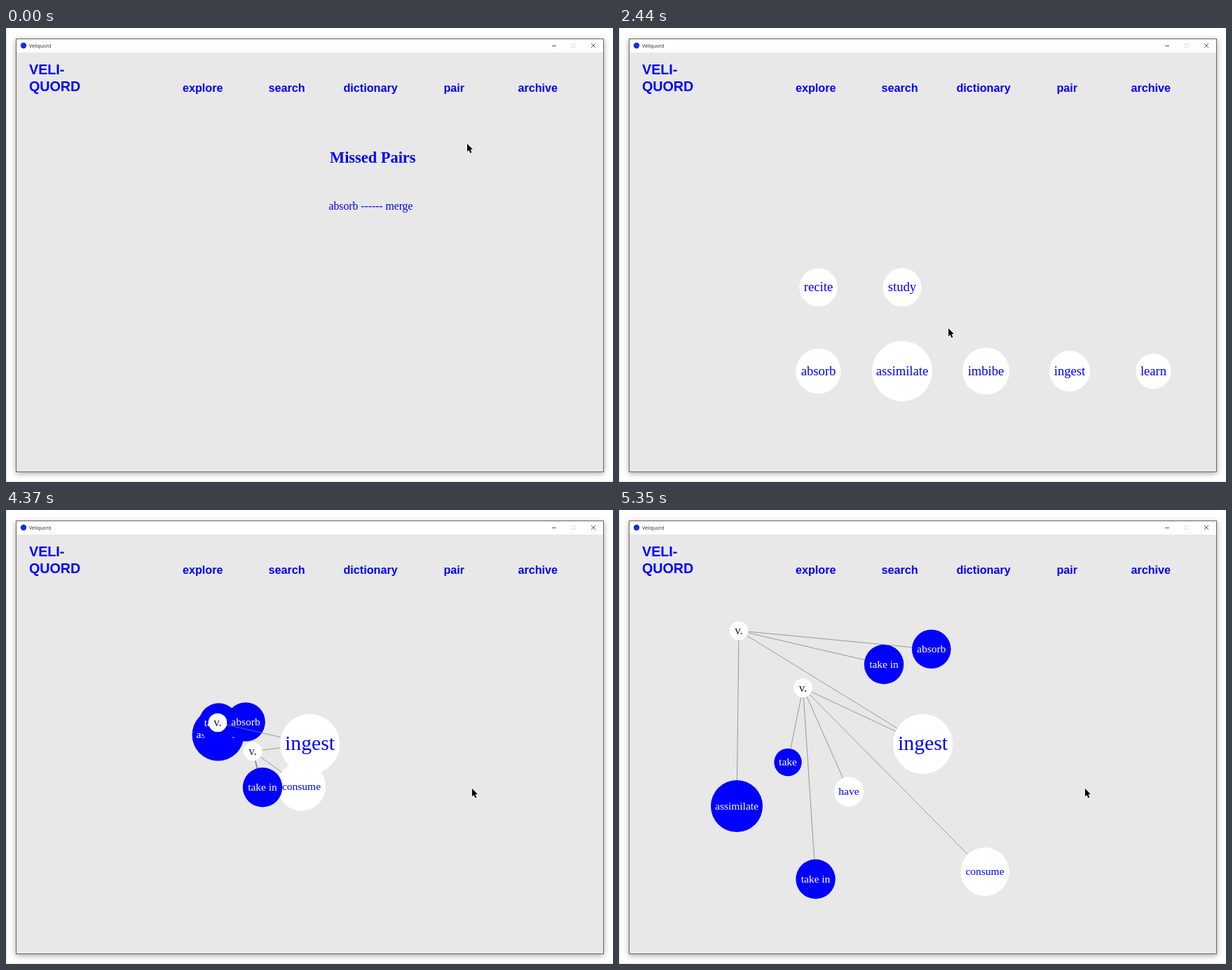
These frames come from a looping animation (866 by 647 pixels, 5410 ms). An HTML page with a canvas:

```html
<!DOCTYPE html>
<html lang="en">
<head>
<meta charset="utf-8">
<title>Veliquord</title>
<style>
  html, body { margin: 0; width: 100%; height: 100%; overflow: hidden; background: #fff; }
  canvas { display: block; }
</style>
</head>
<body>
<canvas id="stage" width="866" height="647"></canvas>
<script>
const ctx = document.getElementById('stage').getContext('2d');
const LOOP = 5410, GRAPH_START = 4125, SLOW = 152.2, FAST = 61;
const BLUE = '#00f', WHITE = '#fff';
const SERIF = '"Liberation Serif", "Times New Roman", serif';
const SANS = '"Liberation Sans", Arial, sans-serif';

// Keys are [step, ...values]
const cursorKeys = [
  [2, 658, 165], [3, 675, 155], [5, 757, 79], [7, 757, 86], [8, 757, 86],
  [9, 757, 126], [12, 625, 290], [15, 478, 421], [16, 470, 428], [19, 462, 446],
  [22, 500, 436], [23, 525, 440], [24, 560, 438], [25, 622, 432], [26, 648, 420], [27, 665, 397]
];
const scrollKeys = [[8, 56], [9, 0], [10, 0], [14, -24], [16, -24], [21, -72]];

// Word, column, row, radius
const words = [
  ['recite', 0, 0, 27.2], ['study', 1, 0, 27.5],
  ['absorb', 0, 1, 32.2], ['assimilate', 1, 1, 43], ['imbibe', 2, 1, 33.5],
  ['ingest', 3, 1, 29], ['learn', 4, 1, 25.3]
];

// Each path holds x, y at graph steps 4, 13 and 20
const hubs = [
  [302, 303, 213, 214, 171, 172],
  [352, 344, 289.5, 281, 262.5, 253.5]
];
const root = { text: 'ingest', x: 433.5, y: 333.5, r: 42.7 };
const nodes = [
  ['consume', 1, 34.7, WHITE, [421.5, 394, 483.5, 477.5, 522, 515.5]],
  ['have', 1, 21.2, WHITE, [366, 391, 362.5, 364.5, 328, 401.5]],
  ['take', 1, 19.7, BLUE, [364, 394, 293.5, 374.5, 241, 359.5]],
  ['take in', 1, 28.2, BLUE, [366, 395.3, 300.8, 484, 280.5, 526]],
  ['assimilate', 0, 37, BLUE, [302.5, 320.5, 216, 395, 168, 422]],
  ['take in', 0, 28.2, BLUE, [303.5, 303.5, 336, 240.5, 378, 220]],
  ['absorb', 0, 27.8, BLUE, [342, 302, 415.2, 229.5, 445.7, 198.3]]
];

function keyed(keys, step) {
  const i = keys.findIndex(k => k[0] >= step);
  if (i === 0) return keys[0].slice(1);
  if (i < 0) return keys[keys.length - 1].slice(1);
  const a = keys[i - 1], b = keys[i], u = (step - a[0]) / (b[0] - a[0]);
  return a.slice(1).map((v, j) => v + (b[j + 1] - v) * u);
}

// Quadratic through the three given poses
function glide(path, k) {
  return [0, 1].map(i => {
    const a = path[i], b = path[i + 2], c = path[i + 4];
    const s = (b - a) / 9, bend = ((c - b) / 7 - s) / 16;
    return a + s * (k - 4) + bend * (k - 4) * (k - 13);
  });
}

function text(str, x, y, font, color = BLUE, align = 'left') {
  ctx.font = font;
  ctx.fillStyle = color;
  ctx.textAlign = align;
  ctx.fillText(str, x, y);
}

function disc(x, y, r, color) {
  ctx.fillStyle = color;
  ctx.beginPath();
  ctx.arc(x, y, r, 0, 7);
  ctx.fill();
}

function bubble(label, x, y, r, size, fill, ink = fill === BLUE ? WHITE : BLUE) {
  disc(x, y, r, fill);
  text(label, x, y + size * 0.3, `${size}px ${SERIF}`, ink, 'center');
}

function stroke(color, width, ...points) {
  ctx.strokeStyle = color;
  ctx.lineWidth = width;
  ctx.beginPath();
  for (let i = 0; i < points.length; i += 4) {
    ctx.moveTo(points[i], points[i + 1]);
    ctx.lineTo(points[i + 2], points[i + 3]);
  }
  ctx.stroke();
}

// Joins the rims of a hub and a node
function link([x1, y1], x2, y2, r) {
  const dx = x2 - x1, dy = y2 - y1, d = Math.hypot(dx, dy);
  if (d < r + 14) return;
  const a = 13.5 / d, b = 1 - r / d;
  stroke('#858585', 0.8, x1 + dx * a, y1 + dy * a, x1 + dx * b, y1 + dy * b);
}

function drawWindow() {
  ctx.fillStyle = WHITE;
  ctx.fillRect(0, 0, 866, 647);
  stroke('#e2e2e2', 1, 0.5, 0, 0.5, 647, 0, 646.5, 866, 646.5);
  ctx.save();
  ctx.shadowColor = 'rgba(0,0,0,.35)';
  ctx.shadowBlur = 8;
  ctx.shadowOffsetY = 2;
  ctx.fillStyle = '#666';
  ctx.fillRect(14, 15, 839, 618);
  ctx.restore();
  ctx.fillStyle = WHITE;
  ctx.fillRect(15, 16, 837, 19);
  ctx.fillStyle = '#e8e8e8';
  ctx.fillRect(15, 35, 837, 597);

  disc(25, 25, 4.2, '#1530e0');
  text('Veliquord', 33, 28, '7px "Open Sans", sans-serif', '#222');
  stroke('#444', 0.9, 779, 25.5, 785, 25.5, 835, 22, 841, 28, 841, 22, 835, 28);
  ctx.strokeStyle = '#ddd';
  ctx.strokeRect(807, 22.5, 5, 5);

  text('VELI-', 33, 66, `bold 19.7px ${SANS}`);
  text('QUORD', 33, 89.5, `bold 19.7px ${SANS}`);
  [['explore', 252], ['search', 374.5], ['dictionary', 481.5], ['pair', 624.5], ['archive', 730.5]]
    .forEach(([label, x]) => text(label, x, 91, `bold 16.15px ${SANS}`));
}

function drawPairs() {
  text('Missed Pairs', 462, 191.5, `bold 22.4px ${SERIF}`);
  text('absorb ------ merge', 460.5, 258.5, `15.7px ${SERIF}`);
}

function drawArchive(step) {
  const [scroll] = keyed(scrollKeys, step);
  const [hx, hy] = keyed(cursorKeys, step - 1);
  for (const [label, col, row, r] of words) {
    const x = 284.5 + col * 119.5, y = 393.5 + row * 119.5 + scroll;
    const hover = Math.hypot(hx - x, hy - y) < r;
    bubble(label, x, y, r, 18.6, hover ? BLUE : WHITE);
  }
}

function drawGraph(k) {
  const centers = hubs.map(path => glide(path, k));
  for (const [label, hub, r, fill, path] of nodes) {
    const [x, y] = glide(path, k);
    link(centers[hub], x, y, r);
    bubble(label, x, y, r, 15.5, fill);
  }
  centers.forEach(c => link(c, root.x, root.y, root.r));
  bubble(root.text, root.x, root.y, root.r, 29.7, WHITE);
  centers.forEach(([x, y]) => bubble('v.', x, y, 13.3, 17, WHITE, '#222'));
}

function drawCursor(x, y) {
  ctx.save();
  ctx.translate(x, y);
  ctx.beginPath();
  [[0, 0], [0, 11.2], [2.5, 8.9], [4.4, 13.3], [6.3, 12.5], [4.4, 8.2], [7.8, 8]]
    .forEach(p => ctx.lineTo(...p));
  ctx.closePath();
  ctx.strokeStyle = 'rgba(255,255,255,.6)';
  ctx.lineWidth = 1;
  ctx.stroke();
  ctx.fillStyle = '#000';
  ctx.fill();
  ctx.restore();
}

function frame(now) {
  const t = now % LOOP, step = Math.floor(t / SLOW);
  drawWindow();
  if (t >= GRAPH_START) drawGraph(Math.floor((t - GRAPH_START) / FAST));
  else if (step >= 6) drawArchive(step);
  else drawPairs();
  drawCursor(...keyed(cursorKeys, t >= GRAPH_START ? 27 : step));
  requestAnimationFrame(frame);
}
requestAnimationFrame(frame);
</script>
</body>
</html>
```
